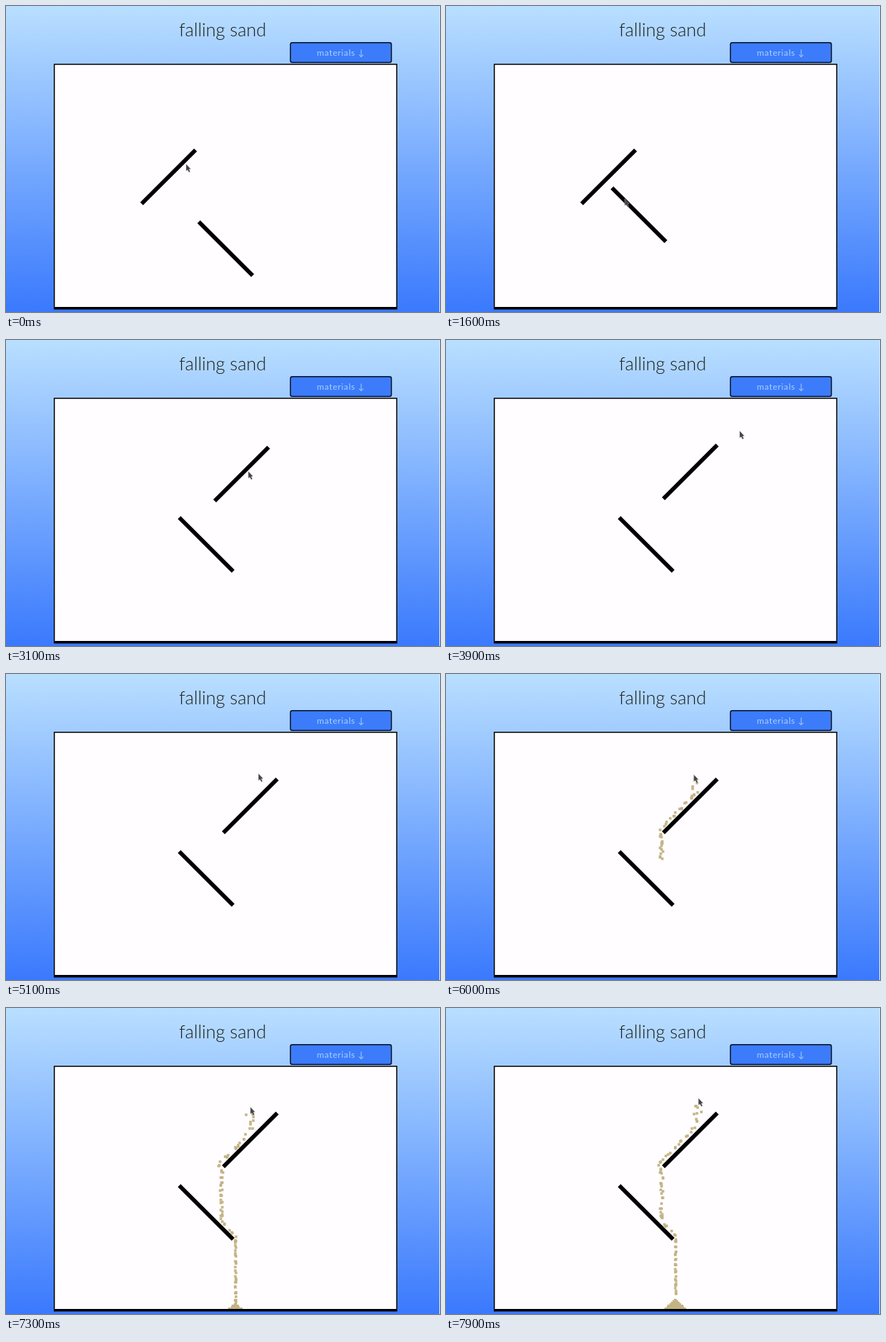
An HTML page with a canvas for the animation above (8000 ms loop, 600 px wide and 424 px high).

```html
<!DOCTYPE html>
<html lang="en">
<head>
<meta charset="utf-8">
<title>falling sand</title>
<style>
  html, body { margin: 0; width: 100%; height: 100%; overflow: hidden; }
  body { position: relative; background: #dbe8ff linear-gradient(#b9dfff, #3a79fd) 0 0 / 599px 100% no-repeat; }
  h1, .button {
    position: absolute; margin: 0; text-align: center; white-space: nowrap;
    font-family: Lato, "Open Sans", sans-serif;
  }
  h1 { left: 0; top: 15px; width: 599px; font-size: 25px; font-weight: 300; line-height: 34px; color: #1c1c1c; }
  .button {
    left: 393px; top: 50px; width: 140px;
    font-size: 12px; line-height: 29px; letter-spacing: .6px; color: #a9d2ff;
  }
  canvas, svg { position: absolute; left: 0; top: 0; }
  line { stroke: #000; stroke-width: 5.6; }
</style>
</head>
<body>
<svg width="600" height="424">
  <rect x="66.75" y="80.75" width="473.5" height="338" fill="#fffdff" stroke="#000" stroke-width="1.5"/>
  <rect x="66" y="417" width="475" height="3.5"/>
  <rect x="393.25" y="50.75" width="139.500" height="27.5" rx="2.500" fill="#3c7bfa" stroke="#081024" stroke-width="1.5"/>
  <line id="upper" x1="187.500" y1="274" x2="262" y2="199.500"/>
  <line id="lower" x1="266.500" y1="299" x2="341" y2="373.500"/>
</svg>
<h1>falling sand</h1>
<div class="button">materials ↓</div>
<canvas id="sand" width="600" height="424"></canvas>
<svg width="600" height="424">
  <path id="cursor" d="M0 0V9.500L2 8L4 11.500L5.500 10.500L4 7H6.500Z" fill="#444" stroke="#bbb" stroke-width=".4"/>
</svg>
<script>
const LOOP = 8, STEP = 0.1, FLOOR = 417;
const POUR = 5.28, LAND = 6.95, SPEED = 160, GRAIN = 3.5;
const $ = id => document.getElementById(id);
const ctx = $('sand').getContext('2d');

// time in seconds, x, y
const stops = [
  [0, 249, 219], [0.9, 284, 314], [1.4, 247, 267], [1.6, 247, 267], [1.9, 257, 261],
  [2.4, 234, 233], [3.1, 335, 182], [3.2, 347, 179], [3.9, 406, 126], [4.4, 449, 64],
  [5.1, 349, 138], [6.5, 340, 140], [6.7, 332, 139], [7.5, 339, 137], [7.9, 349, 125]
];

function cursorAt(t) {
  const n = stops.findIndex(s => s[0] > t);
  if (n < 0) return stops[stops.length - 1].slice(1);
  const [t0, x0, y0] = stops[n - 1], [t1, x1, y1] = stops[n];
  const u = (t - t0) / (t1 - t0), k = u * u * (3 - 2 * u);
  return [x0 + (x1 - x0) * k, y0 + (y1 - y0) * k];
}

// A held bar follows the cursor from grab to release.
function dragged(t, grab, release) {
  const [x0, y0] = cursorAt(grab);
  const [x, y] = cursorAt(Math.min(Math.max(t, grab), release));
  return [x - x0, y - y0];
}

function place(id, [x, y]) {
  $(id).setAttribute('transform', `translate(${x} ${y})`);
}

function rand(n, salt) {
  const s = Math.sin(n * 12.9898 + salt * 78.233) * 43758.5453;
  return s - Math.floor(s);
}

// Grains fall at one speed; the two bars only push them sideways.
function grainX(i, x, y) {
  const depth = rand(i, 3) * 4, wobble = (rand(i, 4) - 0.5) * 4;
  const edge = y < 220 ? 295 + wobble * 0.6 : 298 + wobble;
  const shelf = Math.min(x, Math.max(513 - depth - y, edge));
  return Math.max(shelf, Math.min(y + depth * 0.8, 317.5 + wobble * 0.4));
}

function drawSand(t) {
  ctx.clearRect(0, 0, 600, 424);
  ctx.fillStyle = '#c4b384';
  const height = 13 * Math.sqrt(Math.max(0, (t - LAND) / 0.95));
  for (let i = 0, born = POUR; born <= t; born = POUR + ++i * 0.017) {
    if (rand(i, 5) < 0.12) continue;
    const [cx, cy] = cursorAt(born);
    const x = cx + (rand(i, 1) - 0.5) * 11;
    const y = cy + 5 + rand(i, 2) * 7 + SPEED * (t - born);
    if (y > FLOOR - height) continue;
    ctx.fillRect(Math.round(grainX(i, x, y)) - GRAIN / 2, Math.round(y) - GRAIN / 2, GRAIN, GRAIN);
  }
  for (let k = 0; k < height; k += 2) {
    const half = Math.round((height - k) * 1.05 + rand(k, 6) * 1.5);
    ctx.fillRect(317 - half, FLOOR - 2 - k, half * 2, 2);
  }
}

function draw(ms) {
  const t = Math.floor((ms / 1000 % LOOP) / STEP + 1e-6) * STEP;
  place('cursor', cursorAt(t));
  place('lower', dragged(t, 0.9, 1.9));
  place('upper', dragged(t, 2.4, 3.2));
  drawSand(t);
}

const start = performance.now();
function tick() {
  draw(performance.now() - start);
  requestAnimationFrame(tick);
}
tick();
</script>
</body>
</html>
```
